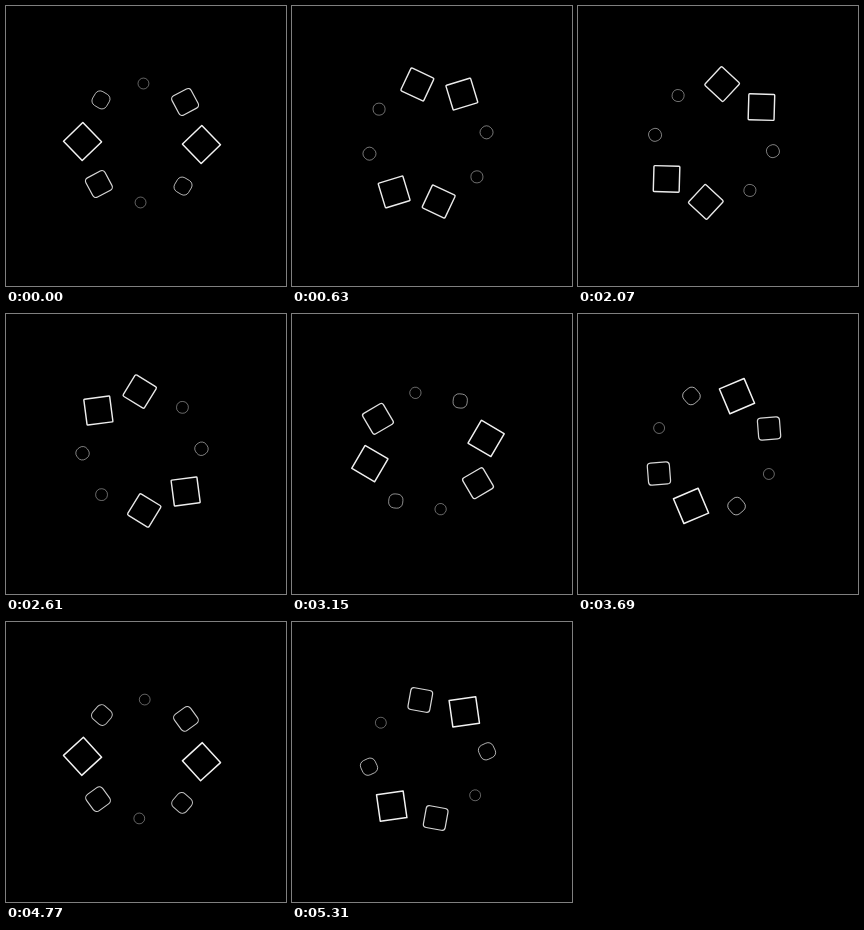
Write an HTML page with a canvas that moves like this. It is 280 px wide and 280 px high and loops after 5.41 s.

```html
<!DOCTYPE html>
<html lang="en">
<head>
<meta charset="utf-8">
<title>Ring of morphing squares</title>
<style>
  html, body { margin: 0; height: 100%; overflow: hidden; background: #000; }
  canvas { display: block; }
</style>
</head>
<body>
<canvas width="280" height="280"></canvas>
<script>
const ctx = document.querySelector('canvas').getContext('2d');
const RAD = Math.PI / 180;
const LOOP = 5410, STEP = 90, LAST = 59;
const COUNT = 8, RADIUS = 59.5, SIZE = 28.5, LINE = 1.5;

// Grows from 0 to 1 and back within 360 degrees, easing at both ends
function growth(phase) {
  const p = 1 - Math.abs(phase % 360 / 180 - 1);
  const ease = x => (2 * x) ** 2.5 / 2;
  return p < 0.5 ? ease(p) : 1 - ease(1 - p);
}

// grow: 0 is a small circle, 1 is a full square
function drawShape(angle, grow) {
  const scale = 0.4 + 0.6 * grow;
  const line = LINE * scale;
  const side = SIZE * scale - line;
  ctx.save();
  ctx.translate(136, 137);
  ctx.rotate(angle * RAD);
  ctx.translate(0, -RADIUS);
  ctx.rotate((90 * grow - 45) * RAD);
  ctx.lineWidth = line;
  ctx.globalAlpha = 0.6 + 0.35 * grow;
  ctx.beginPath();
  ctx.roundRect(-side / 2, -side / 2, side, side, side * (1 - grow) / 2);
  ctx.stroke();
  ctx.restore();
}

function draw(now) {
  const step = Math.min(LAST, Math.floor(now % LOOP / STEP));
  const turn = 1.4 - 1.675 * step;
  const phase = 14 + 16.82 * step;
  ctx.fillStyle = '#000';
  ctx.fillRect(0, 0, 280, 280);
  ctx.strokeStyle = '#fff';
  for (let i = 0; i < COUNT; i++) {
    drawShape(turn + i * 45, growth(phase + i * 90));
  }
  requestAnimationFrame(() => draw(performance.now()));
}

draw(0);
</script>
</body>
</html>
```
